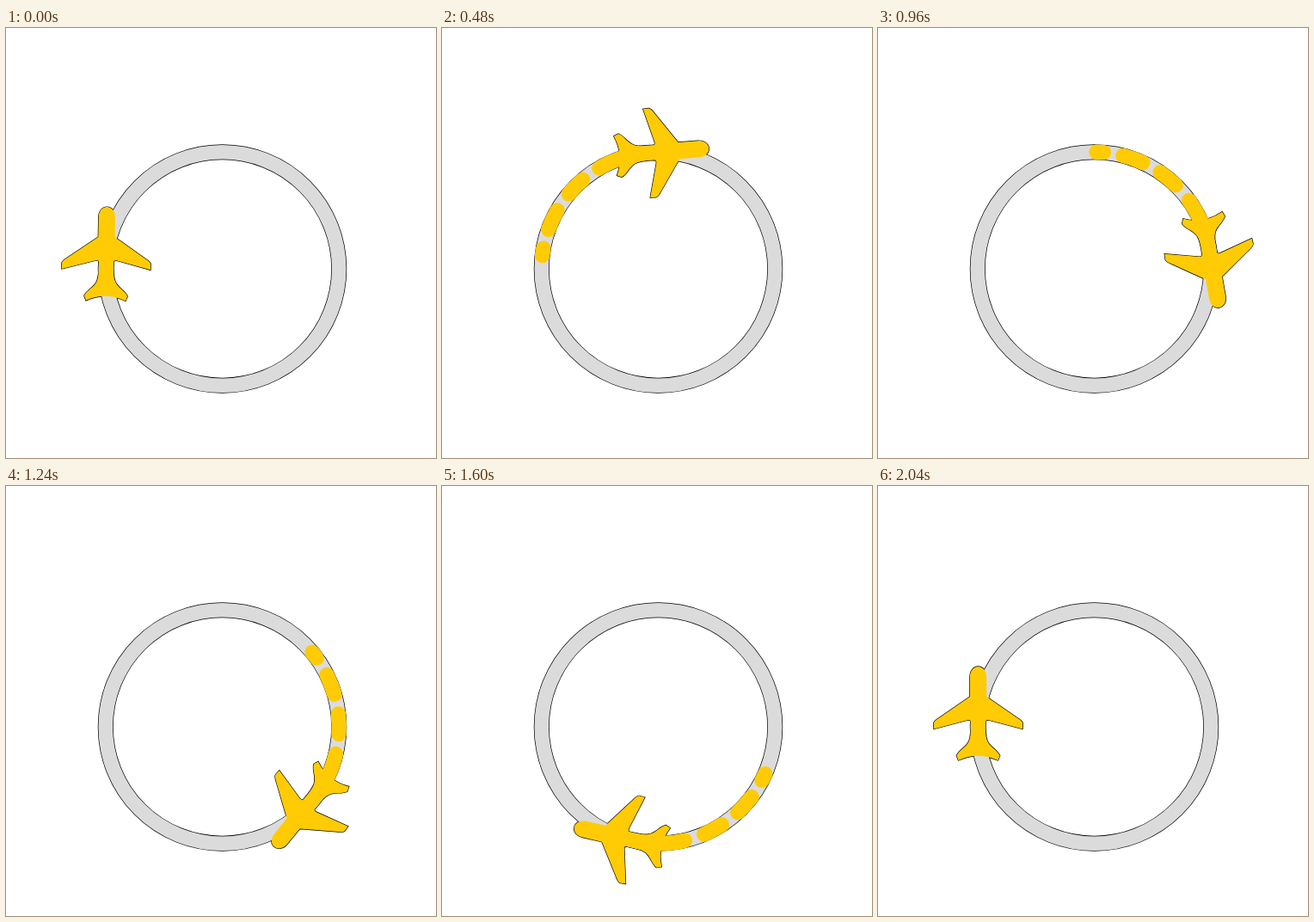
These frames come from a looping animation (500x500 px, 2.12 s). An HTML page:

```html
<!DOCTYPE html>
<html lang="en">
<head>
<meta charset="utf-8">
<title>Plane loop</title>
<style>
  html, body { margin: 0; width: 100%; height: 100%; overflow: hidden; background: #fff; }
  svg { display: block; width: 100%; height: 100%; }
</style>
</head>
<body>
<svg viewBox="0 0 500 500">
  <defs>
    <path id="plane" d="M116.5 210
      C122 210 126.1 215 126.1 222 L126.2 245 L161 269 Q168.3 273.5 168.3 276 L168 282.5
      L129 272.2 Q125.3 271.5 125.1 274 C124.8 284 125 291 127 296 C130 304 138 306 141.7 313.5 L139.5 319
      Q116.5 308.5 93.5 319 L91.3 313.5
      C95 306 103 304 106 296 C108 291 108.2 284 107.9 274 Q107.7 271.5 104 272.2
      L65 282.5 L64.7 276 Q64.7 273.5 72 269 L106.8 245 L106.9 222 C106.9 215 111 210 116.5 210 Z"/>
  </defs>
  <use class="plane" href="#plane" fill="#000" stroke="#000" stroke-width="1.3"/>
  <g fill="none">
    <circle cx="251.5" cy="280" r="135.75" stroke="#000" stroke-width="18"/>
    <circle cx="251.5" cy="280" r="135.75" stroke="#dbdbdb" stroke-width="16.6"/>
    <path id="trail" stroke="#ffcb05" stroke-width="17.4" stroke-linecap="round"/>
  </g>
  <use class="plane" href="#plane" fill="#ffcb05"/>
</svg>
<script>
  const CX = 251.5, CY = 280, R = 135.75;
  const STEP = 40, LOOP = 2120, LAST = 51;
  const TURN = 359.2, TILT = 0.8;
  const CAP = 3.65;
  // Dash centre lines, in degrees relative to the plane
  const DASHES = [[-24.9, -9], [-44.7, -34.8], [-64.8, -54.5], [-84.5, -74.4]];
  const MAX_TRAIL = 78, START = -7, SHRINK_FROM = 42;

  const planes = document.querySelectorAll('.plane');
  const trail = document.getElementById('trail');

  // Angles run clockwise from the leftmost point of the ring
  function point(deg) {
    const a = deg * Math.PI / 180;
    return `${(CX - R * Math.cos(a)).toFixed(2)} ${(CY - R * Math.sin(a)).toFixed(2)}`;
  }

  function trailLength(step, angle) {
    const grown = Math.min(MAX_TRAIL, angle - START);
    const left = (LAST - step) / (LAST - SHRINK_FROM);
    return Math.min(grown, 8 + (MAX_TRAIL - 8) * left);
  }

  function draw(time) {
    const step = Math.min(LAST, Math.floor((time % LOOP) / STEP));
    const angle = TURN * step / LAST;
    const tail = -trailLength(step, angle);

    for (const plane of planes) {
      plane.setAttribute('transform', `rotate(${angle + TILT} ${CX} ${CY})`);
    }
    trail.setAttribute('d', DASHES
      .map(([from, to]) => [Math.max(from, tail), to])
      .filter(([from, to]) => from < to && from < -CAP * 3)
      .map(([from, to]) => `M${point(angle + from)}A${R} ${R} 0 0 1 ${point(angle + to)}`)
      .join(''));
  }

  let start;
  function tick(now) {
    start ??= now;
    draw(now - start);
    requestAnimationFrame(tick);
  }
  draw(0);
  requestAnimationFrame(tick);
</script>
</body>
</html>
```
